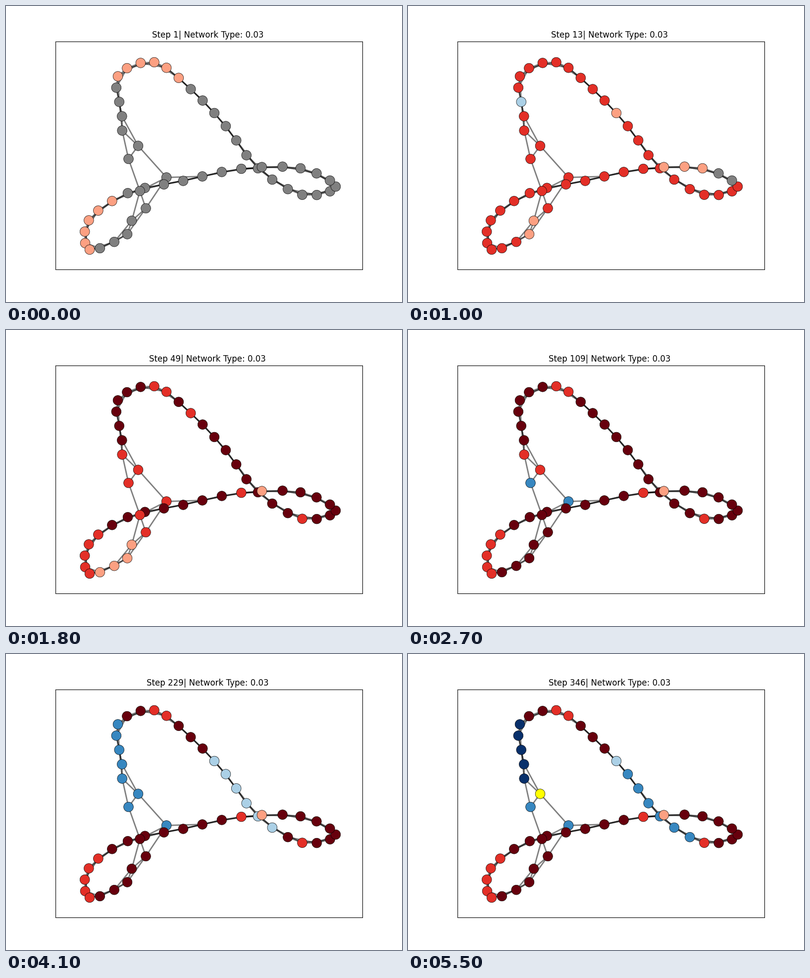
Animation, 800 px wide and 600 px high, one loop 5.6 s. Source, as a matplotlib script:

```python
import numpy as np
import matplotlib.pyplot as plt
from matplotlib.animation import FuncAnimation
from matplotlib.collections import LineCollection

N = 50

# The ring bends sharply at nodes 8 to 15; elsewhere every third node shapes it
KNOT_AT = np.r_[8:16, 16:58:3]
KNOTS = np.array([
    (234.3, 223.5), (234.7, 252.5), (267, 283.5), (247.5, 310),
    (324.2, 347.5), (270.5, 375), (282.5, 410), (254, 435.3),
    (245, 462.5), (169, 493.8), (167.3, 434.5), (246, 379.3), (358, 354.5),
    (475.4, 330), (595, 329), (666, 366), (598.5, 382.7), (509, 329),
    (444, 243.5), (373.2, 168.5), (299.5, 114), (226, 142.5),
])

# Early spread: (start arc, end arc, level, frames taken)
WAVES = [
    ((0, 5), (-13, 14), 1, 6), ((19, 24), (15, 34), 1, 6),
    ((3, 2), (-13, 14), 2, 10), ((22, 21), (17, 31), 2, 10),
]
WAVE_FRAMES = 11

# Later changes: (step, first node, last node, level); negative is blue
EVENTS = [
    (13, 7, 7, -1), (13, 47, 47, 1), (16, 0, 8, 3), (23, 24, 30, 3),
    (34, 33, 39, 3), (34, 15, 18, 1), (43, 41, 48, 3), (43, 1, 2, 2),
    (53, 49, 50, 3), (64, 11, 12, -2), (74, 13, 18, 3), (214, 5, 10, -2),
    (227, 42, 47, -1), (283, 41, 46, -2), (314, 5, 10, -3), (346, 10, 10, 9),
]

# A frame for every tenth step and for every change
OPENING = set(range(1, 14)) - {8, 12}
STEPS = sorted(OPENING | set(range(9, 346, 10)) | {e[0] for e in EVENTS})


def ring_points():
    """Closed cubic curve through the knots, sampled once per node."""
    after = np.append(KNOT_AT[1:], KNOT_AT[0] + N)
    before = np.insert(KNOT_AT[:-1], 0, KNOT_AT[-1] - N)
    ahead = np.roll(KNOTS, -1, axis=0)
    slope = (ahead - np.roll(KNOTS, 1, axis=0)) / (after - before)[:, None]
    pos = np.zeros((N, 2))
    for k, (start, end) in enumerate(zip(KNOT_AT, after)):
        gap, nxt = end - start, (k + 1) % len(KNOTS)
        for i in range(start, end):
            t = (i - start) / gap
            blend = t * t * (3 - 2 * t)
            pos[i % N] = (KNOTS[k] * (1 - blend) + KNOTS[nxt] * blend
                          + gap * t * (1 - t) * ((1 - t) * slope[k] - t * slope[nxt]))
    return pos


def ring_edges():
    edges = [(i, (i + j) % N) for i in range(N) for j in (1, 2)]
    edges.remove((11, 12))
    return edges + [(12, 29), (43, 31)]


def paint(levels, first, last, level):
    for i in range(first, last + 1):
        levels[i % N] = level


def build_states():
    levels, states = [0] * N, []
    for frame, step in enumerate(STEPS):
        if frame < WAVE_FRAMES:
            for start, end, level, length in WAVES:
                u = min(1, frame / length)
                arc = [round(a + (b - a) * u) for a, b in zip(start, end)]
                paint(levels, *arc, level)
        for when, first, last, level in EVENTS:
            if when == step:
                paint(levels, first, last, level)
        states.append(levels[:])
    return states


def tint(level):
    if level == 0:
        return (0.5, 0.5, 0.5, 1)
    if level == 9:
        return (1, 1, 0, 1)
    cmap = plt.cm.Reds if level > 0 else plt.cm.Blues
    return cmap(abs(level) / 3)


STATES = build_states()
POS = ring_points()
ORDER = [(26 - k) % N for k in range(N)]

fig, ax = plt.subplots(figsize=(8, 6), dpi=100)
ax.set(xlim=(100, 720), ylim=(534, 72), xticks=[], yticks=[])
ax.add_collection(LineCollection([(POS[a], POS[b]) for a, b in ring_edges()],
                                 colors="black", alpha=0.5, linewidths=2, zorder=1))
nodes = ax.scatter(*POS[ORDER].T, s=200, edgecolors="black", linewidths=0.5, zorder=2)
title = ax.set_title("")


def draw(frame):
    nodes.set_facecolor([tint(STATES[frame][i]) for i in ORDER])
    title.set_text(f"Step {STEPS[frame]}| Network Type: 0.03 ")
    return nodes, title


anim = FuncAnimation(fig, draw, frames=len(STEPS), init_func=lambda: draw(0),
                     interval=100, repeat=True, repeat_delay=0, blit=False)
plt.show()
```
